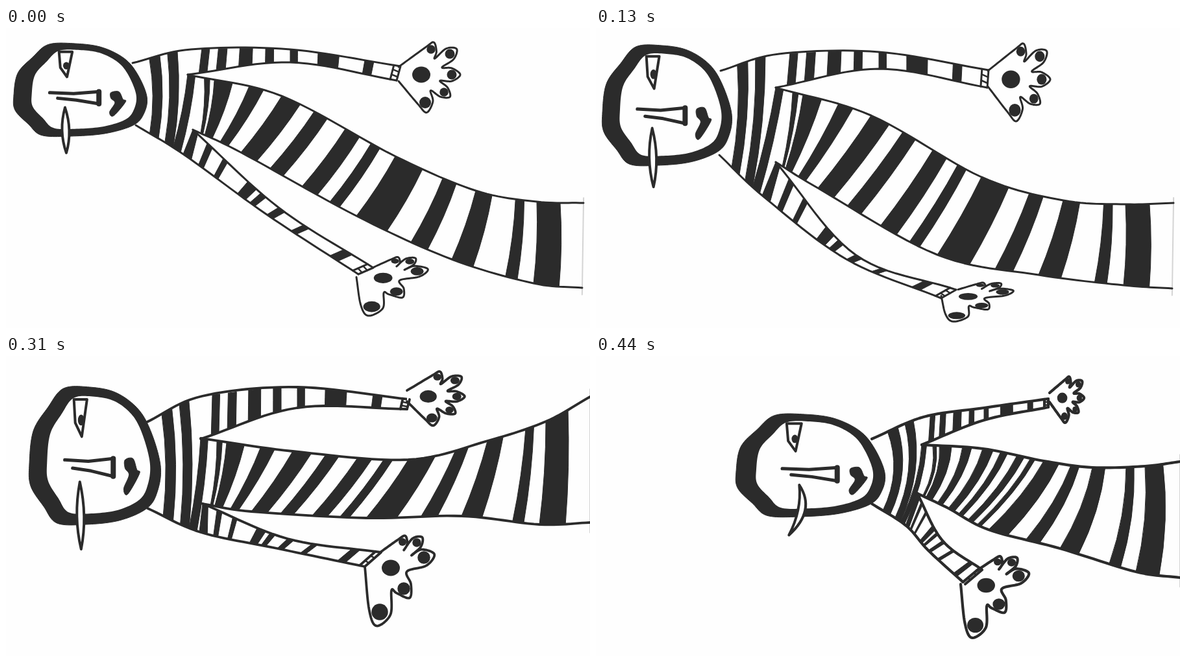
These frames come from a looping animation (900x463 px, 0.49 s). An HTML page with a canvas:

```html
<!DOCTYPE html>
<html lang="en">
<head>
<meta charset="utf-8">
<title>Striped swimmer</title>
<style>
html, body { margin: 0; width: 100%; height: 100%; overflow: hidden; background: #fefefe; }
canvas { display: block; }
</style>
</head>
<body>
<canvas id="stage" width="900" height="463"></canvas>
<script>
const ctx = document.getElementById('stage').getContext('2d');
const INK = '#2b2b2b', PAPER = '#fefefe';

const pairs = flat => flat.flatMap((x, i) => i % 2 ? [] : [[x, flat[i + 1]]]);
const lerp = (a, b, t) => a.map((v, i) => v + (b[i] - v) * t);

// Each stripe is [start, width], measured along the key points of its two edges,
// so the same stripes stretch and shrink with every pose.
const shoulderStripes = [[0.31, 0.2], [0.65, 0.16]];
const bodyStripes = [[0.18, 0.06], [0.29, 0.2], [0.67, 0.15], [1, 0.17], [1.29, 0.11], [1.55, 0.12],
  [1.77, 0.08], [2, 0.3], [2.55, 0.18], [3, 0.24], [3.62, 0.15], [4, 0.48]];
const upperBands = [[0.11, 0.08], [0.28, 0.09], [0.5, 0.13], [0.76, 0.08], [1, 0.07], [1.26, 0.19], [1.68, 0.08]];
const lowerBands = [[0.17, 0.06], [0.36, 0.05], [0.65, 0.1], [0.8, 0.06], [1, 0.07], [1.27, 0.06], [1.69, 0.09]];

// Head and features share one unit box, so a pose only places that box.
const headShape = pairs([0,.56, .03,.32, .14,.15, .26,.01, .46,0, .66,.04, .83,.16, .93,.33,
  1,.57, .98,.75, .9,.88, .69,.97, .43,1, .21,.99, .11,.87, .01,.72]);
const eyeShape = pairs([.34,.09, .35,.26, .4,.36, .44,.09]);
const noseShape = pairs([.27,.53, .45,.54, .64,.52, .64,.65, .47,.61, .33,.59]);
const mouthShape = pairs([.73,.53, .79,.52, .82,.6, .84,.63, .75,.78, .72,.74, .76,.64, .73,.59]);

// Fingertips are [x, y, radius].
const upperHand = {
  size: [93, 104], palm: [35, 50], wrist: [[0, 38], [0, 60]],
  tips: [[50, 11, 9], [79, 18, 10], [82, 50, 10], [70, 77, 9], [41, 93, 12]]
};
const lowerHand = {
  size: [105, 146], palm: [40, 52], wrist: [[25, 27], [0, 50]],
  tips: [[58, 12, 8], [80, 13, 9], [91, 36, 13], [60, 84, 13], [23, 120, 17]]
};

// Key points run from the head outwards; twist turns the figure towards us.
const poses = [
  {
    until: 130, twist: 0, weight: 3, head: [12, 24, 205, 143],
    back: [195,54, 285,33, 438,33, 608,59], upperArm: [280,72, 438,53, 602,81],
    bodyTop: [280,72, 425,105, 600,198, 724,251, 818,268, 890,270],
    bodyBottom: [288,157, 362,192, 540,290, 687,357, 813,394, 888,401],
    lowerArm: [288,157, 420,277, 566,370], chest: [200,150, 275,196, 402,288, 543,380],
    upperHandBox: [605, 22, 93, 104], lowerHandBox: [540, 352, 108, 95]
  },
  {
    until: 230, twist: 0, weight: 3, head: [10, 27, 199, 185],
    back: [192,66, 282,40, 436,37, 605,65], upperArm: [277,92, 436,63, 603,92],
    bodyTop: [277,92, 424,135, 594,230, 720,266, 816,272, 890,270],
    bodyBottom: [277,207, 342,247, 526,350, 682,381, 813,397, 888,402],
    lowerArm: [277,207, 400,350, 555,404], chest: [190,196, 258,260, 386,357, 532,417],
    upperHandBox: [604, 24, 94, 115], lowerHandBox: [532, 392, 109, 63]
  },
  {
    until: 360, twist: 0, weight: 3.8, head: [36, 48, 202, 212],
    back: [215,103, 302,62, 449,48, 622,67], upperArm: [300,128, 449,80, 618,82],
    bodyTop: [300,127, 442,147, 620,160, 742,131, 832,101, 900,63],
    bodyBottom: [303,228, 378,240, 555,250, 702,247, 822,260, 900,257],
    lowerArm: [303,228, 434,282, 578,303], chest: [218,235, 300,272, 418,297, 553,325],
    upperHandBox: [618, 24, 87, 80], lowerHandBox: [553, 275, 105, 146]
  },
  {
    until: 490, twist: 1, weight: 4.2, head: [216, 90, 229, 158],
    back: [425,128, 505,94, 598,80, 697,66], upperArm: [502,137, 598,99, 697,79],
    bodyTop: [502,137, 596,143, 690,162, 765,172, 846,170, 900,163],
    bodyBottom: [495,212, 543,235, 605,268, 715,297, 832,333, 900,342],
    lowerArm: [495,212, 534,285, 595,330], chest: [425,228, 478,262, 512,300, 569,352],
    upperHandBox: [699, 32, 52, 68], lowerHandBox: [562, 307, 103, 132]
  }
];

// Catmull-Rom point at u, where whole numbers fall on the key points.
function pointAt(keys, u) {
  const i = Math.min(Math.floor(u), keys.length - 2), t = u - i;
  const a = keys[i], b = keys[i + 1];
  const before = keys[i - 1] ?? lerp(b, a, 2), after = keys[i + 2] ?? lerp(a, b, 2);
  return [0, 1].map(k => {
    const m = (b[k] - before[k]) / 2, n = (after[k] - a[k]) / 2, d = b[k] - a[k];
    return a[k] + t * (m + t * (3 * d - 2 * m - n + t * (m + n - 2 * d)));
  });
}

function smooth(keys, from = 0, to = keys.length - 1) {
  const count = Math.round((to - from) * 12);
  return Array.from({ length: count + 1 }, (_, i) => pointAt(keys, from + (to - from) * i / count));
}

const smoothLoop = keys => smooth([keys.at(-1), ...keys, keys[0], keys[1]], 1, keys.length + 1);

function draw(points, fill, width, color = INK) {
  ctx.beginPath();
  points.forEach(p => ctx.lineTo(...p));
  paint(fill, width, color);
}

function paint(fill, width, color = INK) {
  if (fill) { ctx.fillStyle = fill; ctx.fill(); }
  if (width) { ctx.strokeStyle = color; ctx.lineWidth = width; ctx.stroke(); }
}

function drawDot([x, y], rx, ry) {
  ctx.beginPath();
  ctx.ellipse(x, y, rx, ry, 0, 0, 7);
  paint(INK);
}

function drawStripe(top, [u, w], bottom, [v, z], bulge) {
  const a = pointAt(top, u), b = pointAt(top, u + w);
  const c = pointAt(bottom, v + z), d = pointAt(bottom, v);
  const bend = (p, q) => [(p[0] + q[0]) / 2 + bulge, (p[1] + q[1]) / 2];
  ctx.beginPath();
  ctx.moveTo(...a);
  ctx.lineTo(...b);
  ctx.quadraticCurveTo(...bend(b, c), ...c);
  ctx.lineTo(...d);
  ctx.quadraticCurveTo(...bend(d, a), ...a);
  paint(INK, 1);
}

function drawCuff(top, bottom, weight) {
  for (const u of [1.94, 2]) draw([pointAt(top, u), pointAt(bottom, u)], null, weight);
  for (const t of [0.3, 0.65]) {
    draw([lerp(pointAt(top, 1.94), pointAt(bottom, 1.94), t), lerp(top[2], bottom[2], t + 0.1)], null, 2.5);
  }
}

function drawHand({ size, palm, wrist, tips }, [x, y, w, h], weight) {
  const sx = w / size[0], sy = h / size[1];
  const place = p => [x + p[0] * sx, y + p[1] * sy];
  const outline = [wrist[0]];
  tips.forEach((tip, i) => {
    const [tx, ty, r] = tip;
    const length = Math.hypot(tx - palm[0], ty - palm[1]);
    const dx = (tx - palm[0]) / length * r, dy = (ty - palm[1]) / length * r;
    outline.push([tx + dy, ty - dx], [tx + dx * 1.3, ty + dy * 1.3], [tx - dy, ty + dx]);
    if (tips[i + 1]) outline.push(lerp(lerp(tip, tips[i + 1], 0.5), palm, 0.3));
  });
  outline.push(wrist[1]);
  draw(smooth(outline.map(place)), PAPER, weight);
  drawDot(place(palm), 14 * sx, 12.5 * sy);
  for (const [tx, ty, r] of tips) drawDot(place([tx, ty]), r * 0.75 * sx, r * 0.75 * sy);
}

function drawHead([x, y, w, h], twist) {
  const place = ([px, py]) => [x + px * w, y + py * h];
  const inset = ([px, py]) => place([0.135 + px * 0.785, 0.07 + py * 0.85]);
  const shifted = ([px, py]) => place([px + 0.04 * twist, py]);

  draw(smoothLoop(headShape.map(place)), INK, 1);
  draw(smoothLoop(headShape.map(inset)), PAPER);
  draw(smoothLoop(mouthShape.map(shifted)), INK, 1);

  const eye = eyeShape.map(place);
  draw([...eye, eye[0]], PAPER, 4);
  drawDot(place([0.395, 0.24]), 5, h * 0.04);

  const tilt = 0.04 * twist;
  const top = place([0.385 + tilt, 0.69]), bottom = place([0.395 - tilt, 1.18]);
  const [mx, my] = place([0.39 + 2.5 * tilt, 0.94]);
  ctx.beginPath();
  ctx.moveTo(...top);
  ctx.quadraticCurveTo(mx + 11, my, ...bottom);
  ctx.quadraticCurveTo(mx - 11, my, ...top);
  paint(PAPER, 4);

  const nose = noseShape.map(shifted);
  draw(nose, null, 5);
  draw([nose[2], nose[3]], null, 8);
}

function drawPose(pose) {
  const { twist, weight } = pose;
  const [back, upperArm, bodyTop, bodyBottom, lowerArm, chest] =
    ['back', 'upperArm', 'bodyTop', 'bodyBottom', 'lowerArm', 'chest'].map(name => pairs(pose[name]));
  // The outer arm lines start at the neck; these parts start level with the armpits.
  const upperOuter = back.slice(1), lowerOuter = chest.slice(1);
  const bulge = 10 + 16 * twist;

  ctx.fillStyle = PAPER;
  ctx.fillRect(0, 0, 900, 463);
  ctx.lineJoin = ctx.lineCap = 'round';
  draw([lerp(bodyTop[5], bodyBottom[5], -0.06), lerp(bodyTop[5], bodyBottom[5], 1.08)], null, 2, '#d4d4d4');

  for (const s of shoulderStripes) drawStripe(back, s, chest, s, bulge);
  drawStripe(bodyTop, [0, 0.08], chest, [0.81, 0.13], bulge / 2);
  drawStripe(bodyBottom, [0, 0.12], chest, [0.98, 0.12], 0);
  for (const s of bodyStripes) drawStripe(bodyTop, s, bodyBottom, s, bulge / 2);
  for (const s of upperBands) drawStripe(upperOuter, s, upperArm, s, 0);
  for (const s of lowerBands) drawStripe(lowerArm, s, lowerOuter, s, 0);
  for (const edge of [back, upperArm, bodyTop, bodyBottom, lowerArm, chest]) draw(smooth(edge), null, weight);

  drawHand(upperHand, pose.upperHandBox, weight);
  drawHand(lowerHand, pose.lowerHandBox, weight);
  drawCuff(upperOuter, upperArm, weight);
  drawCuff(lowerArm, lowerOuter, weight);
  drawHead(pose.head, twist);
}

const start = performance.now();
function tick() {
  const time = (performance.now() - start) % 490;
  drawPose(poses.find(pose => time < pose.until));
  requestAnimationFrame(tick);
}
tick();
</script>
</body>
</html>
```
